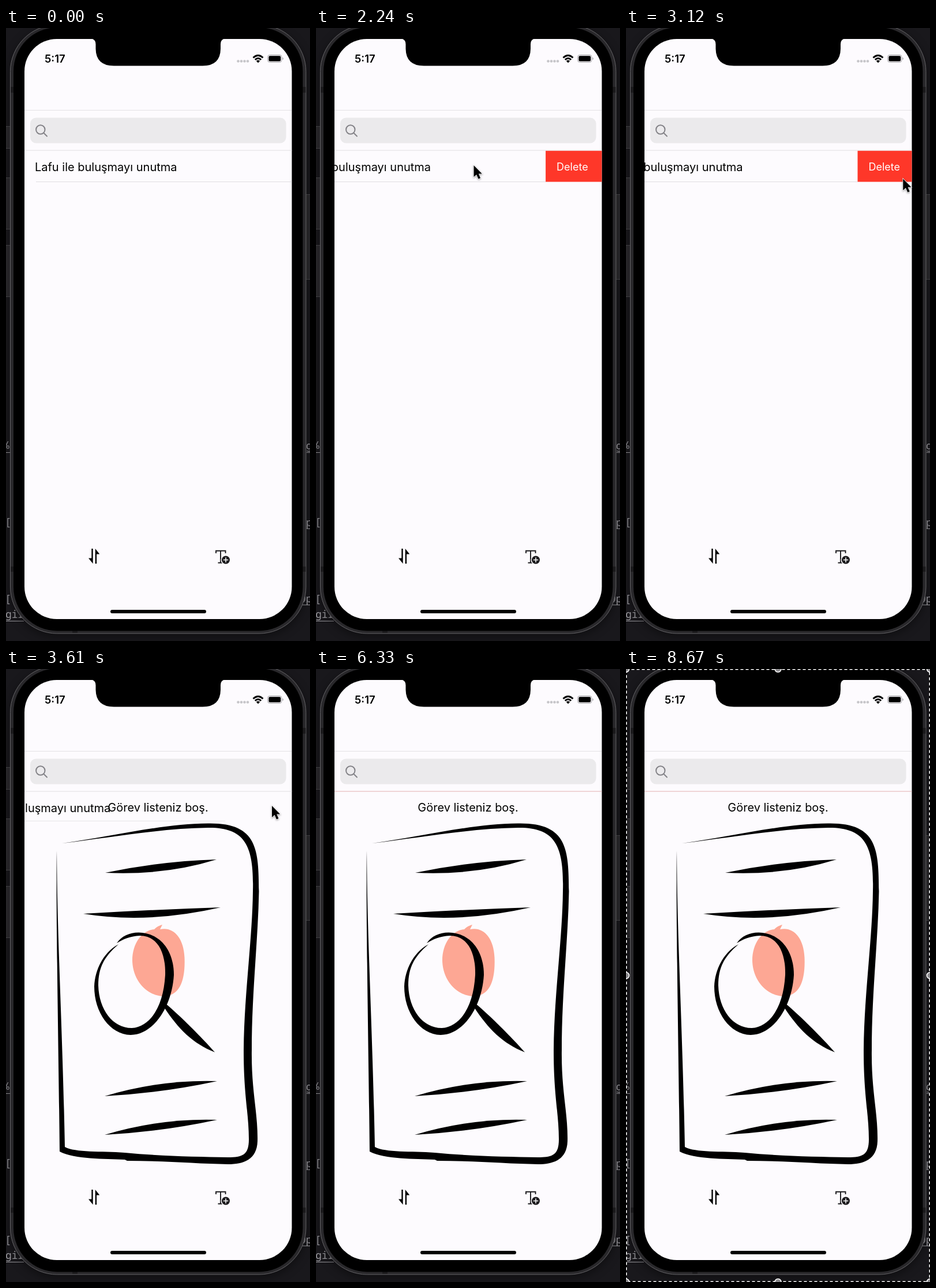
An HTML page that plays this animation: 527x1062 px, repeating every 8700 ms.

```html
<!DOCTYPE html>
<html lang="tr">
<head>
<meta charset="utf-8">
<style>
html, body { margin: 0; width: 100%; height: 100%; overflow: hidden; background: #19181c; }
svg { display: block; }
text { font: 20px Inter, sans-serif; white-space: pre; }
.mono text { font: 18px "Noto Sans Mono", monospace; fill: #99989d; }
</style>
</head>
<body>
<svg width="527" height="1062" viewBox="0 0 527 1062">
  <rect width="527" height="1062" fill="#19181c"/>
  <g class="mono">
    <text x="-5" y="729">%</text>
    <text x="-2" y="862">[</text>
    <text x="-2" y="995">[</text>
    <text x="-1" y="1022">gir</text>
    <text x="520" y="730">g</text>
    <text x="520" y="863">p</text>
    <text x="509" y="995">Op</text>
    <path d="M0 735.5H7M0 1027.5H31M521 735.5H527M521 867.5H527M512 999.5H527" stroke="#99989d"/>
  </g>
  <!-- side buttons -->
  <g fill="#2b2a2d" stroke="#48474a">
    <rect x="-3" y="170.500" width="12" height="38"/>
    <rect x="-3" y="259.500" width="12" height="89"/>
    <rect x="-3" y="376.500" width="12" height="89"/>
    <rect x="518" y="288.500" width="12" height="147"/>
  </g>
  <!-- phone body -->
  <rect x="7.500" y="-5.500" width="512.500" height="1054.500" rx="81" fill="#29282b" stroke="#656467"
    style="filter:drop-shadow(0 5px 8px #0006)"/>
  <path d="M8 102H14V112H8ZM514 102H519.500V112H514ZM8 933H14V942H8ZM514 933H519.500V942H514ZM115 1043H124V1048H115Z" fill="#1b1a1c"/>
  <rect x="13" y="-1" width="501.500" height="1045.500" rx="76"/>
  <rect x="32" y="19" width="463.500" height="1005" rx="56" fill="#fdfbfe"/>
  <path d="M147 18.500Q155.500 19 155.500 28V36Q156 65.500 187 65.500H341Q371.500 65.500 372 36V28Q372 19 380 18.500Z"/>
  <!-- status bar -->
  <text x="67" y="59.500" style="font-size:18.500px;font-weight:600">5:17</text>
  <g fill="#c6c5c9">
    <circle cx="402.500" cy="57.500" r="2.300"/><circle cx="408" cy="57.500" r="2.300"/>
    <circle cx="413.500" cy="57.500" r="2.300"/><circle cx="419" cy="57.500" r="2.300"/>
  </g>
  <g fill="none" stroke="#000" stroke-width="3">
    <path d="M428.500 51.500Q437 43.500 445.500 51.500M431.800 55Q437 50 442.200 55"/>
  </g>
  <path d="M437 60.500L433.800 57Q437 54.500 440.200 57Z"/>
  <rect x="453.500" y="46.500" width="24.500" height="13" rx="4" fill="none" stroke="#a3a2a6"/>
  <rect x="455.300" y="48.300" width="21" height="9.400" rx="2.300"/>
  <path d="M479.500 50.700Q482.500 53 479.500 55.300Z" fill="#a3a2a6"/>
  <!-- search -->
  <path d="M32 142.500H495" stroke="#e3e1e5"/>
  <rect x="42" y="155.500" width="443.500" height="44" rx="10" fill="#ebeaec"/>
  <g fill="none" stroke="#838287" stroke-width="2" stroke-linecap="round">
    <circle cx="59.800" cy="176" r="7.700"/><path d="M65.500 182L71 187.500"/>
  </g>
  <path id="top" d="M32 212H495.500" stroke-width="1"/>
  <!-- empty state -->
  <g id="empty">
    <text x="263.500" y="247" text-anchor="middle">Görev listeniz boş.</text>
    <path fill="#fda794" d="M257 451C262 446 267 444 271 443L267 451C290 446 308 465 309.500 500C311 540 301 566 274 567C245 567 219.500 540 219 505C219 475 236 453 257 451Z"/>
    <path d="M97 302C180 291 270 268 350 267.500C436 266 438 312 438.500 385C437 470 426 560 426 660C425 730 437 770 436 818C435 850 412 858 385 858C330 857 270 852 210 852L206 850C170 848 120 850 93 836C92 720 86 400 88 315C89 480 98 620 102 828C120 838 165 835 206 838C270 844 330 845 385 846C410 846 421 842 421 815C421 770 412 740 412 660C413 560 427 470 428 385C430 308 416 274 350 275C270 276 180 292 97 302Z"/>
    <path d="M172 353Q268 333 365 330Q275 358 172 353ZM134 424Q253 417 372 413Q245 442 134 424Z"/>
    <path id="dash" d="M171 740Q268 711 366 714Q268 735 171 740Z"/>
    <use href="#dash" y="67"/>
    <path d="M192 475C200 463 214 456.500 230 456.500C265 457 291 485 291 530C288 584 256 634 216 634C180 633 153 595 153 550C154 520 170 490 195 477C168 500 160 520 160 548C161 590 185 622 218 622C250 620 273 585 276 530C277 490 262 462 232 462C215 463 203 468 192 475Z"/>
    <path d="M277 580C300 599 340 639 362 664C324 649 299 624 274 586Z"/>
  </g>
  <!-- list row -->
  <svg id="row" x="32" y="212.500" width="463.500">
    <g id="cell">
      <text x="264.500" y="35" text-anchor="end">Lafu ile buluşmayı unutma</text>
      <path id="sep" d="M20 0H463.500" stroke="#dfdde1"/>
    </g>
    <g id="del">
      <rect width="200" height="54" fill="#fe3729"/>
      <text x="19" y="34" fill="#fff" style="font-size:18px">Delete</text>
    </g>
  </svg>
  <!-- toolbar -->
  <path d="M148.300 902H150.700V928L143 918.500H148.300ZM154.700 928V902L162.300 911.500H157.100V928Z"/>
  <g fill="none" stroke="#1d1c1f" stroke-width="1.900">
    <path d="M364 910V905.800H380.500V910M372 905.800V926.500M367.500 926.500H376"/>
  </g>
  <circle cx="381" cy="921.500" r="8.500" fill="#fdfbfe"/>
  <circle cx="381" cy="921.500" r="7" fill="#1d1c1f"/>
  <path d="M376.800 921.500H385.200M381 917.300V925.700" stroke="#fff" stroke-width="1.500"/>
  <rect x="181" y="1008" width="166" height="6" rx="3"/>
  <path id="cursor" d="M0 0V20L4.600 15.800L8 23.500L11.500 22L8.300 14.500H14.300Z" stroke="#fff" stroke-width="1.500"
    paint-order="stroke" style="filter:drop-shadow(0 1.500px 1.500px #0006)"/>
  <!-- capture selection -->
  <g id="select">
    <rect x=".5" y=".5" width="526" height="1061" fill="none" stroke="#000" stroke-width="2"/>
    <rect x=".5" y=".5" width="526" height="1061" fill="none" stroke="#fff" stroke-width="2" stroke-dasharray="5 4"/>
    <g id="knobs" fill="#8b8a8d" stroke="#fff" stroke-width="1.500"></g>
  </g>
</svg>
<script>
const $ = id => document.getElementById(id);
const show = (id, on) => $(id).style.display = on ? '' : 'none';
const smooth = p => p * p * (3 - 2 * p);

// Eased value of a list of [time, value] keys
function track(t, keys) {
  if (t <= keys[0][0]) return keys[0][1];
  for (let i = 1; i < keys.length; i++) {
    const [a, from] = keys[i - 1], [b, to] = keys[i];
    if (t < b) return from + (to - from) * smooth((t - a) / (b - a));
  }
  return keys[keys.length - 1][1];
}

const cursorX = [[690, 498], [1240, 374], [1820, 374], [2140, 272], [2220, 272], [2600, 449],
  [2700, 449], [2980, 488], [3380, 461], [4309, 461], [4520, 463], [4622, 470]];
const cursorY = [[690, 896], [1240, 236], [1820, 236], [2140, 238], [2220, 238], [2600, 251],
  [2700, 251], [2980, 271], [3380, 237], [4309, 237], [4622, 1025]];
const swipe = [[1840, 0], [2150, -100], [2350, -94]];
const DELETE = 3560, COLLAPSE = 350;

for (const x of [0, 263.5, 527])
  for (const y of [0, 531, 1062])
    if (x !== 263.5 || y !== 531)
      $('knobs').innerHTML += `<circle cx="${x}" cy="${y}" r="5.5"/>`;

function draw(now) {
  const t = now % 8700;
  const gone = smooth(Math.min(1, Math.max(0, (t - DELETE) / COLLAPSE)));
  const shift = track(t, swipe) - 369 * gone;
  const height = 54.5 * (1 - gone);

  show('row', gone < 1);
  $('row').setAttribute('height', height);
  $('cell').setAttribute('transform', `translate(${shift})`);
  $('sep').setAttribute('transform', `translate(0 ${height - 0.5})`);
  show('del', t < DELETE && shift < 0);
  $('del').setAttribute('transform', `translate(${463.5 + shift})`);
  show('empty', t >= DELETE);
  $('top').setAttribute('stroke', gone < 1 ? '#e0dee2' : '#e2afb0');

  show('cursor', t >= 730 && t < 4640);
  $('cursor').setAttribute('transform', `translate(${track(t, cursorX)} ${track(t, cursorY)})`);
  show('select', t >= 8660);
}

const start = performance.now();
function tick() {
  draw(performance.now() - start);
  requestAnimationFrame(tick);
}
tick();
</script>
</body>
</html>
```
